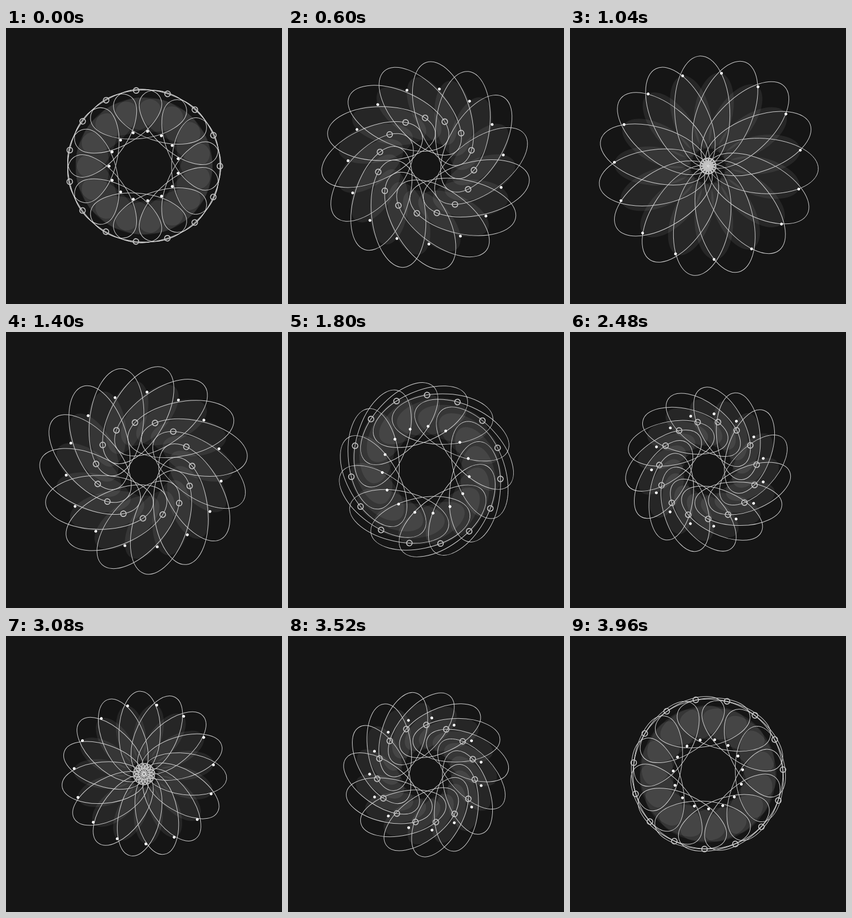
An HTML page with a canvas for the animation above (4 s loop, 500 by 500 pixels).

```html
<!DOCTYPE html>
<html lang="en">
<head>
<meta charset="utf-8">
<title>Rosette</title>
<style>
  html, body { margin: 0; width: 100%; height: 100%; overflow: hidden; background: #151515; }
  canvas { display: block; width: 500px; height: 500px; }
</style>
</head>
<body>
<canvas width="500" height="500"></canvas>
<script>
  const ctx = document.querySelector('canvas').getContext('2d');
  const LOOP = 4000, COUNT = 15, TAU = 2 * Math.PI;
  const STEP = TAU / COUNT;
  const OUTLINE = { a: 100, b: 50, offset: 0, side: -1 };
  const PETAL = { a: 70, b: 35, offset: STEP / 2, side: 1 };

  function eachArm(offset, draw) {
    for (let i = 0; i < COUNT; i++) {
      ctx.save();
      ctx.rotate(offset - i * STEP);
      ctx.beginPath();
      draw();
      ctx.restore();
    }
  }

  function drawEllipses({ a, b, offset }, pose, paint) {
    eachArm(offset, () => {
      ctx.ellipse(pose.dist, 0, a * pose.scale, b * pose.scale, -pose.tilt, 0, TAU);
      ctx[paint]();
    });
  }

  // A marker running along its ellipse against the turn follows a plain circle.
  function drawMarkers({ a, b, offset, side }, pose, radius, paint) {
    const mean = side * pose.scale * (a + b) / 2;
    const shift = side * pose.scale * (a - b) / 2;
    const x = pose.dist + shift + mean * Math.cos(2 * pose.tilt);
    const y = -mean * Math.sin(2 * pose.tilt);
    eachArm(offset, () => {
      ctx.arc(x, y, radius, 0, TAU);
      ctx[paint]();
    });
  }

  function poseAt(time) {
    const phase = TAU * (time % LOOP) / LOOP;
    const swell = (1 + Math.sin(phase)) / 2;
    return {
      tilt: Math.PI / 2 - phase,
      scale: 0.75 + 0.25 * swell,
      dist: 100 - 25 * (1 - swell) ** 2
    };
  }

  function render(time) {
    const pose = poseAt(time);
    ctx.setTransform(1, 0, 0, 1, 0, 0);
    ctx.fillStyle = '#151515';
    ctx.fillRect(0, 0, 500, 500);
    ctx.translate(250, 250);

    ctx.fillStyle = 'rgba(255, 255, 255, 0.076)';
    drawEllipses(PETAL, pose, 'fill');

    ctx.strokeStyle = '#d4d4d4';
    ctx.lineWidth = 1;
    drawEllipses(OUTLINE, pose, 'stroke');

    ctx.strokeStyle = '#c4c4c4';
    ctx.lineWidth = 1.8;
    drawMarkers(OUTLINE, pose, 5, 'stroke');

    ctx.fillStyle = '#fff';
    drawMarkers(PETAL, pose, 2.5, 'fill');
  }

  const start = performance.now();
  function tick() {
    render(performance.now() - start);
    requestAnimationFrame(tick);
  }
  tick();
</script>
</body>
</html>
```
